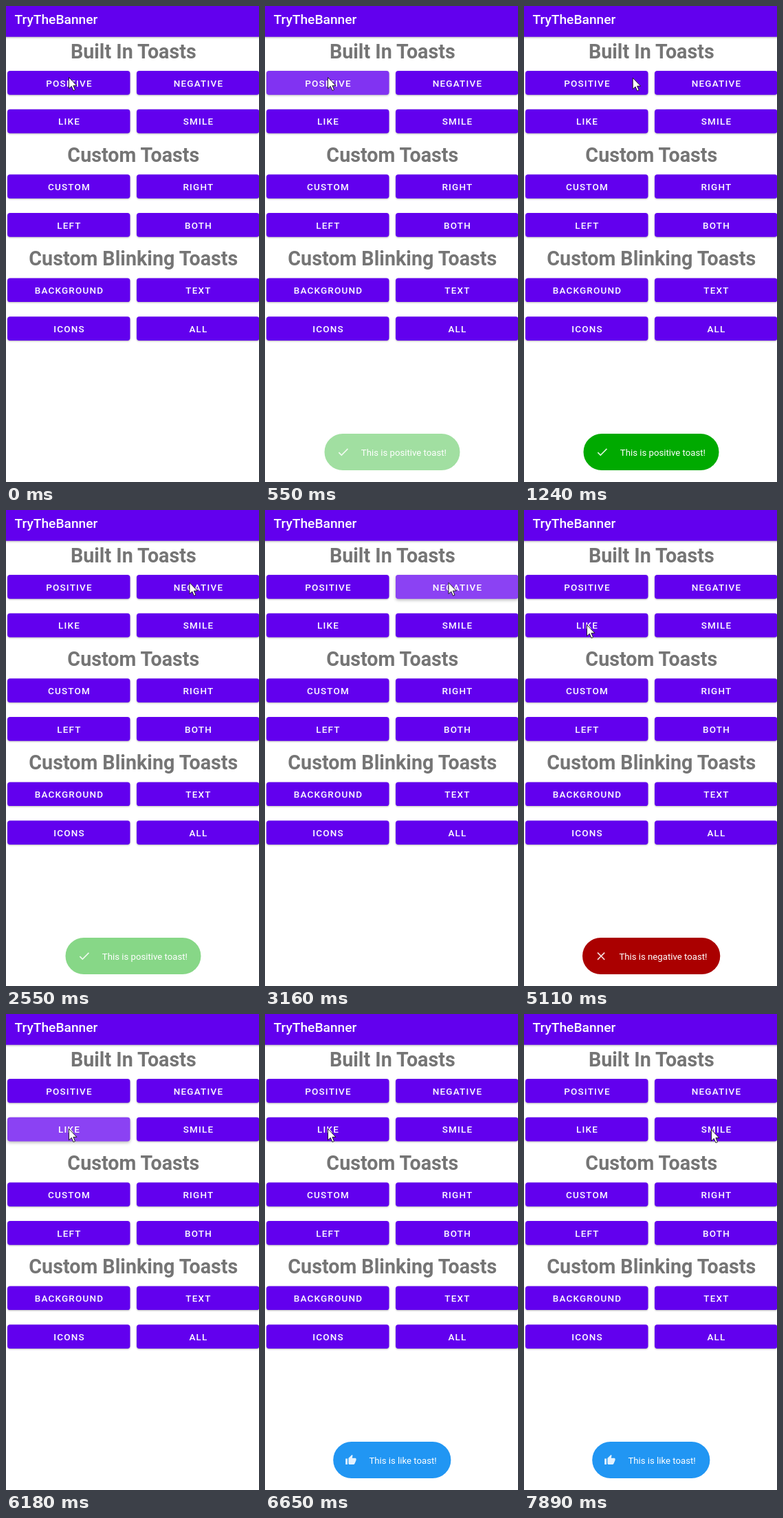
An HTML page that plays this animation: 368x690 px, repeating every 8000 ms.

```html
<!DOCTYPE html>
<html lang="en">
<head>
<meta charset="utf-8">
<style>
html, body { margin: 0; width: 368px; height: 690px; overflow: hidden; background: #fff; }
svg { display: block; font-family: Roboto, sans-serif; }
.title { font-size: 19.2px; font-weight: 500; fill: #fff; }
.head { font-size: 28.7px; font-weight: 700; fill: #757575; text-anchor: middle; }
.label { font-size: 13.5px; font-weight: 500; letter-spacing: 1.2px; fill: #fff; text-anchor: middle; }
.msg { font-size: 13.2px; fill: #fff; }
.icon { fill: #fff; fill-opacity: .87; }
.bar { filter: drop-shadow(0 1px 1.5px rgba(0, 0, 0, .3)); }
</style>
</head>
<body>
<svg id="stage" width="368" height="690" viewBox="0 0 368 690"></svg>
<script>
const LOOP = 8000, PURPLE = '#6200ee';
const stage = document.getElementById('stage');

function add(tag, attrs, text, parent = stage) {
  const el = document.createElementNS('http://www.w3.org/2000/svg', tag);
  for (const key in attrs) el.setAttribute(key, attrs[key]);
  if (text) el.textContent = text;
  return parent.appendChild(el);
}

const clamp = v => Math.max(0, Math.min(1, v));
const span = (t, from, to) => clamp((t - from) / (to - from));
const smooth = p => p * p * (3 - 2 * p);
const mix = (a, b, p) => a + (b - a) * p;

const sections = [
  ['Built In Toasts', 'POSITIVE', 'NEGATIVE', 'LIKE', 'SMILE'],
  ['Custom Toasts', 'CUSTOM', 'RIGHT', 'LEFT', 'BOTH'],
  ['Custom Blinking Toasts', 'BACKGROUND', 'TEXT', 'ICONS', 'ALL']
];

const presses = {
  POSITIVE: { at: 200, x: 92, y: 104 },
  NEGATIVE: { at: 2900, x: 267, y: 105 },
  LIKE: { at: 5930, x: 92, y: 167 }
};

const toasts = [
  { x: 86.5, w: 197, color: '#00aa00', textX: 139.8, text: 'This is positive toast!',
    show: 870, hide: 2200, at: [104, 636.8, .81],
    icon: 'M9 16.17L4.83 12 3.41 13.41 9 19 21 7 19.59 5.59z' },
  { x: 85, w: 200.3, color: '#aa0000', textX: 138.4, text: 'This is negative toast!',
    show: 3640, hide: 5080, at: [102.4, 637, .81],
    icon: 'M19 6.41L17.59 5 12 10.59 6.41 5 5 6.41 10.59 12 5 17.59 6.41 19 12 13.41 17.59 19 19 17.59 13.41 12z' },
  { x: 99.2, w: 171.2, color: '#2196f3', textX: 151.4, text: 'This is like toast!',
    show: 6660, hide: 9000, at: [116.5, 638.2, .7],
    icon: 'M1 21h4V9H1zM23 10a2 2 0 0 0-2-2h-6.3l1-4.9a1.5 1.5 0 0 0-.4-1.1L14.2 1 7.6 7.6A2 2 0 0 0 7 9v10a2 2 0 0 0 2 2h9a2 2 0 0 0 1.8-1.2l3-7.1a2 2 0 0 0 .2-.7z' }
];

const moves = [
  { from: 960, to: 1630, x: 267, y: 105.3 },
  { from: 3830, to: 4710, x: 91.5, y: 166.5 },
  { from: 7160, to: 7890, x: 272.5, y: 167.7 }
];

function addButton(name, x, y) {
  const box = { x, y, width: 178.5, height: 34.7, rx: 3.9 };
  const rect = add('rect', { ...box, fill: PURPLE });
  setShadow(rect, 0);
  const press = presses[name];
  if (press) {
    add('rect', box, '', add('clipPath', { id: name }));
    const layer = add('g', { 'clip-path': `url(#${name})` });
    press.rect = rect;
    press.ripple = add('circle', { fill: '#fff', opacity: 0 }, '', layer);
    press.midX = x + 89;
    press.midY = y + 17;
  }
  add('text', { class: 'label', x: x + 90, y: y + 22.6 }, name);
}

function setShadow(rect, lift) {
  rect.style.filter = `drop-shadow(0 ${1 + lift}px ${1 + lift}px rgba(0,0,0,.28))`;
}

// Static screen
add('rect', { class: 'bar', x: -10, y: -10, width: 388, height: 54.7, fill: PURPLE });
add('text', { class: 'title', x: 12.5, y: 26 }, 'TryTheBanner');
sections.forEach(([head, ...names], i) => {
  const top = i * 150.2;
  add('text', { class: 'head', x: 185.3, y: 75.6 + top }, head);
  names.forEach((name, k) => addButton(name, k % 2 ? 190 : 2, 94 + top + (k > 1 ? 55.8 : 0)));
});

for (const toast of toasts) {
  const [x, y, size] = toast.at;
  toast.el = add('g', {});
  add('rect', { x: toast.x, y: 620, width: toast.w, height: 53, rx: 26.5, fill: toast.color }, '', toast.el);
  add('path', { class: 'icon', d: toast.icon, transform: `translate(${x} ${y}) scale(${size})` }, '', toast.el);
  add('text', { class: 'msg', x: toast.textX, y: 651.6 }, toast.text, toast.el);
}

const cursor = add('path', {
  d: 'M0 0V16.3L3.8 12.8 6.5 19 9 17.9 6.4 11.9H11.4Z',
  fill: '#fff', stroke: '#111', 'stroke-width': .9
});

function draw(t) {
  for (const p of Object.values(presses)) {
    const age = t - p.at, grow = smooth(span(age, 0, 230));
    const on = span(age, 20, 100) * (1 - span(age, 290, 560));
    p.ripple.setAttribute('cx', mix(p.x, p.midX, grow));
    p.ripple.setAttribute('cy', mix(p.y, p.midY, grow));
    p.ripple.setAttribute('r', mix(28, 96, grow));
    p.ripple.setAttribute('opacity', .26 * on);
    setShadow(p.rect, on);
  }
  for (const toast of toasts) {
    const left = 1 - span(t, toast.show - 400, toast.show);
    const gone = span(t, toast.hide, toast.hide + 480);
    toast.el.setAttribute('opacity', (1 - left * left) * (1 - gone * gone));
  }
  let x = 91.5, y = 103.5;
  for (const m of moves) {
    const p = smooth(span(t, m.from, m.to));
    x = mix(x, m.x, p);
    y = mix(y, m.y, p);
  }
  cursor.setAttribute('transform', `translate(${x} ${y})`);
}

const start = performance.now();
function frame() {
  draw((performance.now() - start) % LOOP);
  requestAnimationFrame(frame);
}
frame();
</script>
</body>
</html>
```
